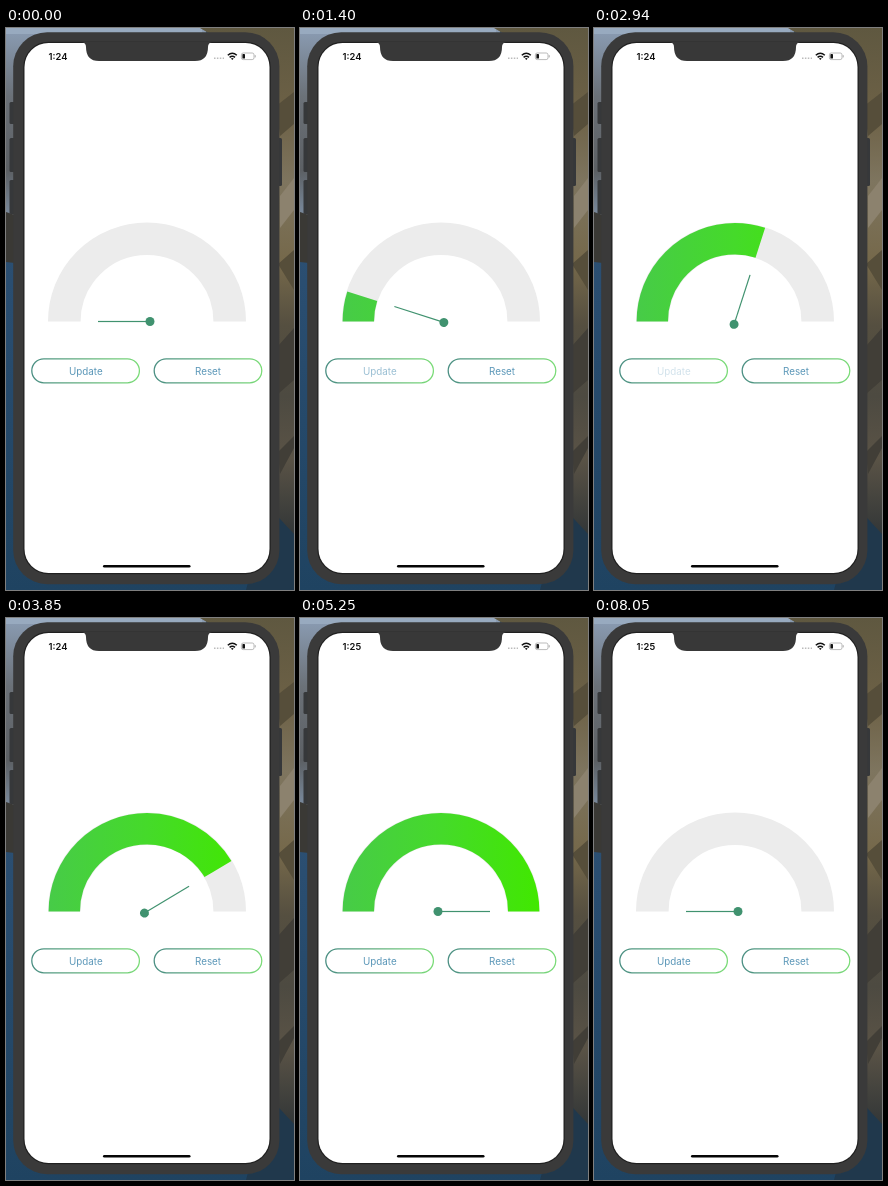
Recreate the animation shown at these times as an HTML page. Size 288 by 562 pixels, loop 8.12 s.

```html
<!DOCTYPE html>
<html lang="en">
<head>
<meta charset="utf-8">
<title>Gauge</title>
<style>
  html, body { margin: 0; width: 100%; height: 100%; overflow: hidden; background: #26435a; }
  svg { display: block; width: 100%; height: 100%; }
  text { font-family: Inter, Roboto, sans-serif; }
  .label { font-size: 9.8px; fill: #5b97b8; text-anchor: middle; }
  .clock { font-size: 9.4px; font-weight: 600; fill: #111; }
  .arc { fill: none; stroke-width: 32.6; }
  .capsule { fill: none; stroke-width: 1.3; }
</style>
</head>
<body>
<svg viewBox="0 0 288 562">
  <defs>
    <linearGradient id="sea" x1="0" y1="0" x2="0" y2="1">
      <stop offset="0" stop-color="#35577a"/>
      <stop offset=".5" stop-color="#294d70"/>
      <stop offset="1" stop-color="#1f4361"/>
    </linearGradient>
    <linearGradient id="haze" x1="0" y1="0" x2="0" y2="1">
      <stop offset="0" stop-color="#8b9db4"/>
      <stop offset=".36" stop-color="#6b7178"/>
      <stop offset=".75" stop-color="#5c6064"/>
      <stop offset="1" stop-color="#7b8ca0"/>
    </linearGradient>
    <linearGradient id="cliff" x1="0" y1="0" x2="0" y2="1">
      <stop offset="0" stop-color="#5f5840"/>
      <stop offset=".17" stop-color="#6d6146"/>
      <stop offset=".3" stop-color="#7e755f"/>
      <stop offset=".46" stop-color="#75684a"/>
      <stop offset=".58" stop-color="#554f40"/>
      <stop offset=".72" stop-color="#4d4a41"/>
      <stop offset=".84" stop-color="#5a5346"/>
      <stop offset="1" stop-color="#2f3436"/>
    </linearGradient>
    <linearGradient id="meter" gradientUnits="userSpaceOnUse" x1="42" y1="0" x2="240" y2="0">
      <stop offset="0" stop-color="#47cb48"/>
      <stop offset=".5" stop-color="#45da2a"/>
      <stop offset="1" stop-color="#41e800"/>
    </linearGradient>
    <linearGradient id="edge">
      <stop offset="0" stop-color="#4b8f83"/>
      <stop offset=".5" stop-color="#62b07e"/>
      <stop offset="1" stop-color="#7bdc78"/>
    </linearGradient>
  </defs>

  <!-- wallpaper -->
  <rect width="288" height="562" fill="url(#sea)"/>
  <rect width="200" height="190" fill="url(#haze)"/>
  <path d="M0 0H196V6H0Z" fill="#98aabf"/>
  <path d="M0 184L18 190V236L0 234Z" fill="#3a3935"/>
  <path d="M194 0H288V512L262 480V40Z" fill="url(#cliff)"/>
  <path d="M270 78L288 64V96L274 108ZM272 236L288 222V262Z" fill="#564e3a"/>
  <path d="M274 168L288 150V182L274 200Z" fill="#8c826e"/>
  <path d="M272 318L288 300V352L272 366ZM272 424L288 408V420L274 446Z" fill="#413e37"/>
  <path d="M262 478L288 506V562H240Z" fill="#20384c"/>

  <!-- phone -->
  <g fill="#36383a">
    <rect x="3.5" y="74" width="6" height="22" rx="1.5"/>
    <rect x="3.5" y="110" width="6" height="34" rx="1.5"/>
    <rect x="3.5" y="152" width="6" height="34" rx="1.5"/>
    <rect x="271" y="110" width="5" height="48" rx="1.5"/>
  </g>
  <rect x="7.2" y="4.2" width="266.2" height="552" rx="34" fill="#3a3a3a"/>
  <rect x="18.5" y="15" width="245" height="530" rx="24" fill="#fff" stroke="#202020" stroke-width="2.4" paint-order="stroke"/>
  <path d="M76 14Q80 15 80 19Q80 33 93 33H189Q202 33 202 19Q202 15 206 14Z" fill="#383838"/>
  <rect x="97" y="536.9" width="87.5" height="2.6" rx="1.3" fill="#050505"/>

  <!-- status bar -->
  <text id="clock" class="clock" x="42.6" y="31.8">1:24</text>
  <path d="M208 30.3H218" stroke="#bbb" stroke-width="1.5" stroke-dasharray="1.5 1.4"/>
  <g fill="none" stroke="#111" stroke-width="1.5">
    <path d="M221.8 27.3Q226.3 23.3 230.8 27.3M223.6 29.4Q226.3 27 229 29.4"/>
    <path d="M226.3 32L224.9 30.5Q226.3 29.4 227.7 30.5Z" fill="#111" stroke="none"/>
  </g>
  <rect x="235.4" y="25" width="12.6" height="6.6" rx="1.8" fill="none" stroke="#aaa" stroke-width=".8"/>
  <rect x="236.4" y="26" width="2.6" height="4.6" rx=".7" fill="#111"/>
  <path d="M249.2 27.2V29.4" stroke="#aaa"/>

  <!-- gauge -->
  <path class="arc" stroke="#ececec" d="M58.3 293.5A82.7 82.7 0 0 1 223.7 293.5"/>
  <path id="fill" class="arc" style="stroke-width: 31.4" stroke="url(#meter)" d="M58.3 293.5A82.7 82.7 0 0 1 223.7 293.5" pathLength="1"/>
  <g id="needle" fill="#40926f">
    <rect x="92" y="292.9" width="52" height="1.2"/>
    <circle cx="144" cy="293.5" r="4.5"/>
  </g>

  <!-- buttons -->
  <g stroke="url(#edge)">
    <rect class="capsule" x="25.8" y="330.8" width="107.6" height="24" rx="12"/>
    <rect class="capsule" x="148.2" y="330.8" width="107.6" height="24" rx="12"/>
  </g>
  <text id="update" class="label" x="79.8" y="346.6">Update</text>
  <text id="reset" class="label" x="202" y="346.6">Reset</text>
</svg>

<script>
  const LOOP = 8120, STEP = 70, DURATION = 636;
  const updateTaps = [930, 1240, 1530, 1820, 2110, 2400, 2850, 3230, 3615, 4000];
  const resetTap = 5884;
  const clockTick = 4550;

  const el = id => document.getElementById(id);
  const clock = el('clock'), fill = el('fill'), needle = el('needle');
  const update = el('update'), reset = el('reset');
  const clamp = v => Math.min(1, Math.max(0, v));

  // cubic-bezier(.42, 0, .58, 1)
  function easeInOut(x) {
    if (x <= 0 || x >= 1) return clamp(x);
    let lo = 0, hi = 1;
    for (let i = 0; i < 24; i++) {
      const s = (lo + hi) / 2, r = 1 - s;
      if (1.26 * s * r * r + 1.74 * s * s * r + s ** 3 < x) lo = s; else hi = s;
    }
    return lo * lo * (3 - 2 * lo);
  }

  const moved = (t, tap) => easeInOut((t - tap) / DURATION);

  // A label dims while pressed and recovers shortly after release.
  function labelOpacity(t, taps) {
    return Math.min(...taps.map(tap => {
      const age = t - tap;
      return age < -100 ? 1 : 0.22 + 0.78 * clamp((age - 80) / 160);
    }));
  }

  function draw(t) {
    const raised = updateTaps.reduce((sum, tap) => sum + moved(t, tap) / 10, 0);
    const value = raised * (1 - moved(t, resetTap));
    fill.style.visibility = value > 0.0005 ? 'visible' : 'hidden';
    fill.setAttribute('stroke-dasharray', `${value} 2`);
    needle.setAttribute('transform', `rotate(${value * 180} 141 293.5)`);
    update.style.opacity = labelOpacity(t, updateTaps);
    reset.style.opacity = labelOpacity(t, [resetTap]);
    clock.textContent = t < clockTick ? '1:24' : '1:25';
  }

  function frame() {
    const t = performance.now() % LOOP;
    draw(Math.floor(t / STEP) * STEP);
    requestAnimationFrame(frame);
  }
  frame();
</script>
</body>
</html>
```
